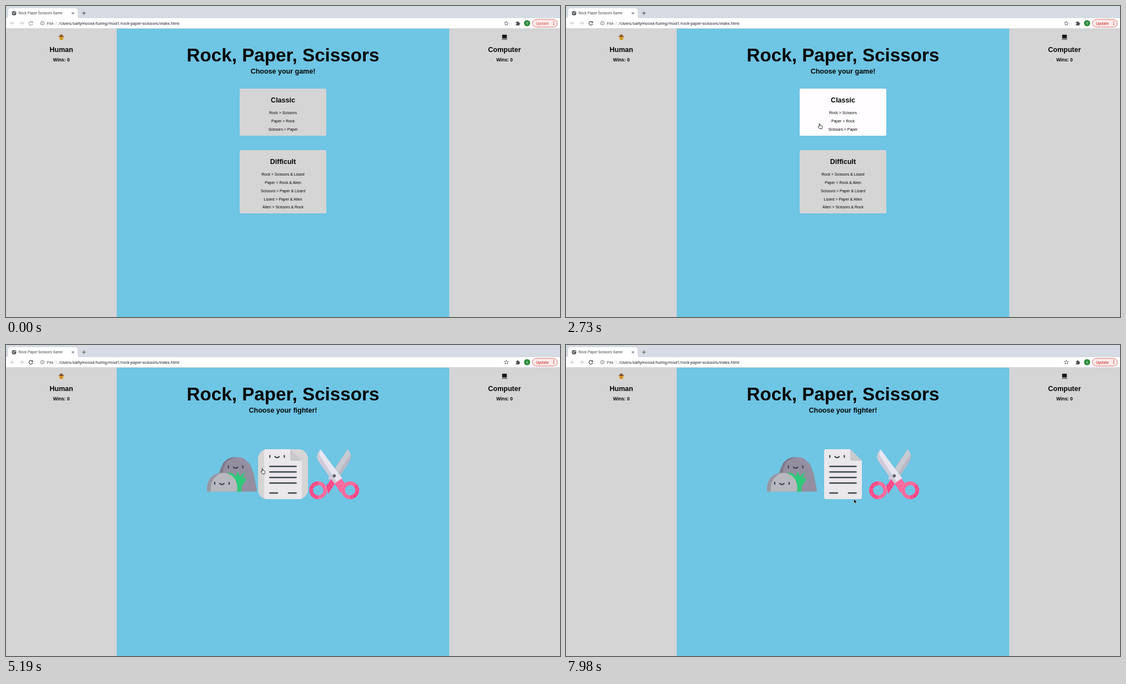
Animation of 998x561 px, one loop 8000 ms. Source, as an HTML page:

```html
<!DOCTYPE html>
<html lang="en">
<head>
<meta charset="utf-8">
<title>Rock Paper Scissors Game</title>
<style>
  html, body { margin: 0; width: 100%; height: 100%; overflow: hidden; }
  svg { display: block; width: 100vw; height: 100vh; }
  text { font-family: "Liberation Sans", Arial, sans-serif; fill: #050505; }
  .ui text { font-family: Roboto, sans-serif; fill: #45484c; }
  .mid { text-anchor: middle; }
  .h1 { font-size: 33.2px; font-weight: bold; }
  .h2 { font-size: 12.5px; font-weight: bold; }
  .h3 { font-size: 8.4px; font-weight: bold; }
  .rule { font-size: 6.95px; }
  .card { fill: #d5d5d5; }
  .card.on { fill: #fffdff; }
  .tile { fill: #d5d5d5; visibility: hidden; }
  .game .tile.on { visibility: visible; }
  .fighters, .game .menu { display: none; }
  .game .fighters { display: inline; }
  .line { fill: none; stroke: #3d444c; stroke-linecap: round; stroke-linejoin: round; }
  .reload { stroke: #3f4246; }
  .ui .update { fill: #c5221f; font-size: 7.25px; }
  .idle .reload { stroke: #96999d; }
  .idle .ui .update { fill: #c9524c; }
</style>
</head>
<body>
<svg id="stage" viewBox="0 0 998 561">
  <rect width="998" height="561" fill="#d5d5d5"/>
  <rect x="199.5" y="40" width="599" height="521" fill="#6fc5e4"/>

  <g class="ui">
    <rect width="998" height="23" fill="#d7dbe3"/>
    <path d="M0 22Q4 22 4 18V9Q4 4 9 4H124Q129 4 129 9V18Q129 22 133 22H998V40.5H0Z" fill="#fff"/>
    <path d="M0 40.5H998" stroke="#d0d2d5" stroke-width=".7"/>
    <circle cx="14.5" cy="13" r="4" fill="#4b4f54"/>
    <path d="M11.5 12.2l2 .3 1 1.6-1 1.8M14.5 9.8l.6 1.6 2.3.6" fill="none" stroke="#fff" stroke-width="1"/>
    <text x="22.8" y="15.3" font-size="6.58">Rock Paper Scissors Game</text>
    <path d="M118.5 11l4 4m0-4l-4 4M137 13h6.6M140.3 9.7v6.6" stroke="#45484c" stroke-width="1"/>
    <path d="M15 31H8.3m3.2-3.2L8.3 31l3.2 3.2M24.7 31h6.7m-3.2-3.2l3.2 3.2-3.2 3.2" fill="none" stroke="#b3b6ba" stroke-width="1"/>
    <path class="reload" d="M47.3 29.2A3.3 3.3 0 1 0 47.9 32M48 27.6v2.4h-2.4" fill="none" stroke-width="1.1"/>
    <circle cx="65.6" cy="31" r="3.3" fill="none" stroke="#55585c" stroke-width=".8"/>
    <path d="M65.6 30.6v2.2M65.6 29v.8" stroke="#55585c" stroke-width=".9"/>
    <text x="73.8" y="33.7" font-size="7.57">File</text>
    <path d="M90.2 27v8" stroke="#b9bcc0" stroke-width=".7"/>
    <text x="94.8" y="33.7" font-size="7.57" style="fill:#222428">/Users/saltymoose/turing/mod1/rock-paper-scissors/index.html</text>
    <path d="M901.2 27.4l1.1 2.4 2.6.3-1.9 1.8.5 2.6-2.3-1.3-2.3 1.3.5-2.6-1.9-1.8 2.6-.3Z" fill="none" stroke="#505357" stroke-width=".8"/>
    <path d="M918.6 29h2q-.3-1.8 1.1-1.8t1.1 1.8h2v2q1.6-.2 1.6 1.1t-1.6 1.1v1.8h-6.2v-2q1.5 0 1.5-1t-1.5-1Z" fill="#505357"/>
    <circle cx="938.7" cy="31" r="5.6" fill="#2c8c3c"/>
    <text class="mid" x="938.7" y="33.2" font-size="6" style="fill:#e8f5ea">S</text>
    <rect x="948.3" y="24.2" width="45" height="13.8" rx="6.9" fill="#fcebea" stroke="#d5655f" stroke-width=".9"/>
    <text class="update" x="954.6" y="33.6">Update</text>
    <path d="M986.6 27.8v7" stroke="#c5221f" stroke-width="1.6" stroke-linecap="round" stroke-dasharray="0 2.8"/>
  </g>

  <g>
    <circle cx="99.6" cy="57.6" r="4.1" fill="#eeb03c"/>
    <path d="M94.4 53.4q1.6 1.2 2.6.4l.6-2.2h4l.6 2.2q1 .8 2.6-.4-.7 2.8-5.2 2.8t-5.2-2.8Z" fill="#8a5429"/>
    <path d="M97.6 59.2q2 1.8 4 0M98 57.2v.6M101.2 57.2v.6" fill="none" stroke="#553015" stroke-width=".8"/>
    <path d="M893.8 51.8h8.4v6.6h-8.4Z" fill="#151515"/>
    <path d="M893.8 58.6h8.4l1 2.6h-10.4Z" fill="#8c8d90"/>
    <path d="M894 59.8h8.6" stroke="#4b4c4f" stroke-width=".7"/>
    <text class="mid h2" x="99.7" y="82.6">Human</text>
    <text class="mid h3" x="99.7" y="100">Wins: 0</text>
    <text class="mid h2" x="898" y="82.6">Computer</text>
    <text class="mid h3" x="898" y="100">Wins: 0</text>
    <text class="mid h1" x="499" y="99.6">Rock, Paper, Scissors</text>
    <text class="mid h2" x="499" y="122.4" id="prompt"></text>
  </g>

  <g class="menu" id="menu"></g>

  <g class="fighters">
    <g id="tiles"></g>
    <g id="rock">
      <path d="M384 264.5V229L391 213 400 205Q413 200 427 204L439 214 446 231 452 262Q452 264.5 450 264.5Z" fill="#948fa0"/>
      <path d="M384 232L391 213 400 205Q407 202 414 202L399 209 392 220 390 236Z" fill="#7d7989"/>
      <path d="M416 264.5L404 238 400 230Q409 230 414 237L418 227 421 237 430 229Q429 236 425 241L433 239Q431 249 425 253L424 264.5Z" fill="#2fc878"/>
      <path d="M362 263Q361 250 369 239 378 230 391 230.5 406 231 413 243 418 253 416.500 262 416 264.500 413 264.500H363.500Q362 264.500 362 263Z" fill="#b8b8bf"/>
      <path d="M362 263Q361 250 369 239 377 231 388 230.500 376 236 371 247 368 255 369 264.500H363.500Q362 264.500 362 263Z" fill="#9797a1"/>
    </g>
    <g id="paper">
      <path d="M468.500 188H512L533 209V274.500Q533 278 529.500 278H468.500Q465 278 465 274.500V191.500Q465 188 468.500 188Z" fill="#ebe8ec"/>
      <path d="M512 188L533 209H516Q512 209 512 205Z" fill="#cac9ce"/>
      <path class="line" stroke-width="2.7" d="M475.500 219H522.500M475.500 229H522.500M475.500 239H522.500M475.500 249H522.500M475.500 267H489M509 267H522.500"/>
    </g>
    <g id="scissors">
      <path d="M615.500 188.500Q622 195 621.500 203 621 207 618 211L594 249 580 241Z" fill="#b9bac6"/>
      <path d="M615.500 188.500Q619 192 620.500 197L588 246 580 241Z" fill="#c9cad4"/>
      <path d="M577 254L592 233 599 241 580 269Z" fill="#ff4d89"/>
      <path d="M567 188.500Q560 195 560.500 203 561 207 564 211L592 250 606 241Z" fill="#e7e6f0"/>
      <path d="M567 188.500Q560 195 560.500 203 561 207 564 211L592 250 596 247 565 199Q564 193 567 188.500Z" fill="#cdccd8"/>
      <path d="M592 250L604 241 613 253 603 267Z" fill="#ff6c9d"/>
      <g fill="none" stroke-width="6.700">
        <circle cx="562.300" cy="262" r="12.700" stroke="#ff6c9d"/>
        <path d="M562.300 249.300A12.700 12.700 0 0 0 562.300 274.700" stroke="#ff4d89"/>
        <circle cx="620" cy="262" r="12.700" stroke="#ff6c9d"/>
        <path d="M620 274.700A12.700 12.700 0 0 0 629 253" stroke="#ff4d89"/>
      </g>
      <circle cx="591.300" cy="236" r="2.900" fill="#666875"/>
    </g>
    <g id="faces"></g>
  </g>

  <g id="pointer">
    <path id="arrow" d="M0 0V7.500L1.800 5.900 3.100 8.800 4.300 8.300 3.100 5.500H5.500Z" fill="#050505" stroke="#fff" stroke-width=".5"/>
    <path id="hand" d="M0 .6C0-.5 1.500-.5 1.500 .6V3.400L4.800 4Q6 4.400 5.800 5.800L5 9.500H1L-1.500 6.300Q-1.800 4.700-.6 5L0 5.700Z" fill="#fff" stroke="#222" stroke-width=".9"/>
  </g>
</svg>
<script>
const LOOP = 8000, FOCUS = 2250, START_GAME = 5090;
const $ = id => document.getElementById(id);

function add(parent, tag, attrs, text) {
  const el = document.createElementNS("http://www.w3.org/2000/svg", tag);
  for (const k in attrs) el.setAttribute(k, attrs[k]);
  if (text) el.textContent = text;
  parent.append(el);
  return el;
}

function target(parent, cls, x, y, w, h, rx) {
  const el = add(parent, "rect", { class: cls, x, y, width: w, height: h, rx });
  return { el, x, y, w, h };
}

function card(y, h, name, rules) {
  const box = target($("menu"), "card", 421, y, 156, h, 2.5);
  add($("menu"), "text", { class: "mid h2", x: 499, y: y + 24.6 }, name);
  rules.forEach((rule, i) =>
    add($("menu"), "text", { class: "mid rule", x: 499, y: y + 46.3 + i * 14.75 }, rule));
  return box;
}

const cards = [
  card(149, 85, "Classic", ["Rock > Scissors", "Paper > Rock", "Scissors > Paper"]),
  card(260, 114, "Difficult", ["Rock > Scissors & Lizard", "Paper > Rock & Alien",
    "Scissors > Paper & Lizard", "Lizard > Paper & Alien", "Alien > Scissors & Rock"])
];
const tiles = [361.5, 454, 546.5].map(x => target($("tiles"), "tile", x, 188, 90, 90, 17));

for (const [x, y] of [[413.5, 219.5], [389, 249], [488.3, 200.5]])
  add($("faces"), "path", { class: "line", "stroke-width": 2.3,
    d: `M${x - 13} ${y - 1}v3M${x + 13} ${y - 1}v3M${x - 3.8} ${y + .8}q3.800 4 7.600 0` });

// Pointer moves: start, end, number of steps, way points
const moves = [
  [1400, 2160, 9, [2, 334], [130, 297], [280, 252], [400, 219], [453, 204], [453, 204]],
  [2250, 2730, 6, [453, 204], [456, 212]],
  [2930, 3410, 6, [458, 217], [465, 246], [473, 270], [479, 284], [482, 290], [483, 292]],
  [3810, 4190, 5, [480, 284], [474, 262], [467, 240], [462, 226], [461, 223]],
  [5090, 5190, 2, [461, 223], [461, 223]],
  [5390, 6050, 8, [461, 234], [452, 290], [440, 318], [424, 298], [410, 262], [405, 250]],
  [6250, 6340, 2, [470, 250], [500, 251]],
  [6640, 6730, 2, [550, 260], [588, 252]],
  [7030, 7220, 3, [578, 290], [560, 345], [551, 365]],
  [7410, 7980, 7, [551, 363], [545, 345], [530, 306], [518.7, 278]]
];

function along(points, u) {
  const p = u * (points.length - 1);
  const i = Math.min(Math.floor(p), points.length - 2);
  return points[i].map((v, k) => v + (points[i + 1][k] - v) * (p - i));
}

function hit({ t, x, y }) {
  if (t < FOCUS) return null;
  return (t < START_GAME ? cards : tiles).find(b =>
    x >= b.x && x < b.x + b.w && y >= b.y && y < b.y + b.h) || null;
}

const steps = moves.flatMap(([from, to, n, ...points]) =>
  Array.from({ length: n }, (_, i) => {
    const u = i / (n - 1), [x, y] = along(points, u);
    return { t: Math.floor((from + (to - from) * u) / 10) * 10, x, y };
  }));
// Hover styles trail the pointer by one step
steps.forEach((s, i) => {
  s.over = hit(s);
  s.lit = i ? steps[i - 1].over : null;
});

function draw(t) {
  const s = steps.findLast(step => step.t <= t);
  const game = t >= START_GAME;
  $("stage").classList.toggle("game", game);
  $("stage").classList.toggle("idle", t < FOCUS);
  $("prompt").textContent = game ? "Choose your fighter!" : "Choose your game!";
  for (const b of [...cards, ...tiles]) b.el.classList.toggle("on", !!s && s.lit === b);
  $("pointer").style.display = s ? "" : "none";
  if (!s) return;
  const hand = s.over && s.over === s.lit;
  $("hand").style.display = hand ? "" : "none";
  $("arrow").style.display = hand ? "none" : "";
  $("pointer").setAttribute("transform", `translate(${s.x} ${s.y}) scale(${t < FOCUS ? 1.95 : 1})`);
}

const begin = performance.now();
function tick() {
  draw((performance.now() - begin) % LOOP);
  requestAnimationFrame(tick);
}
tick();
</script>
</body>
</html>
```
